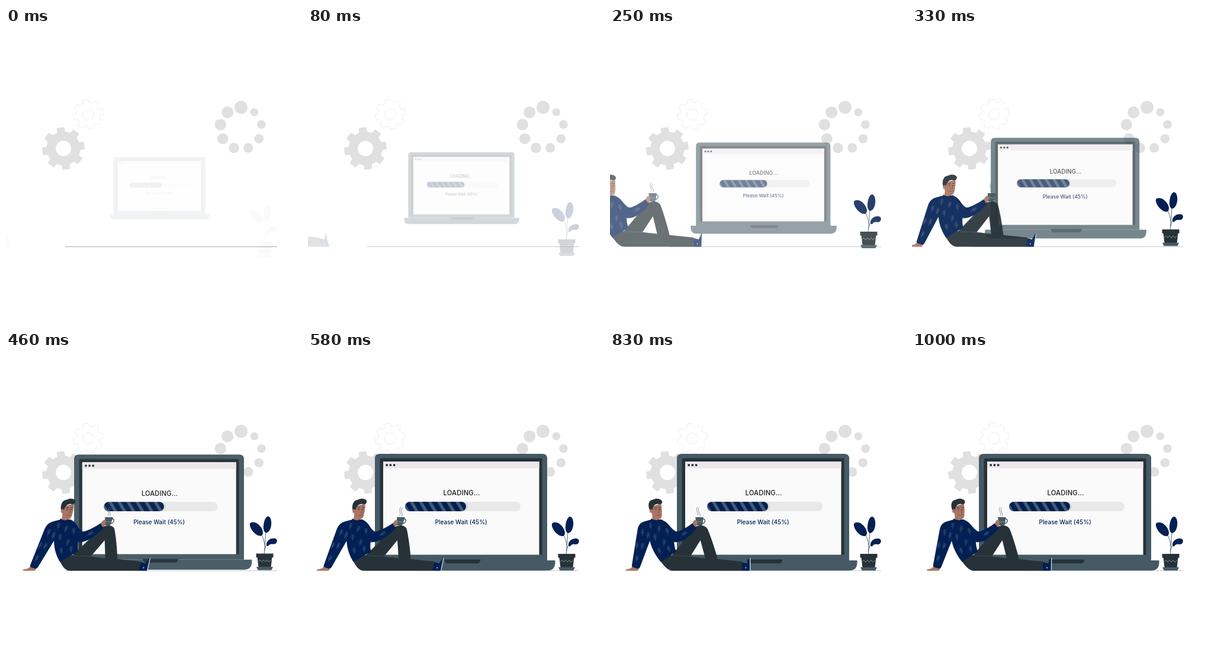
An HTML page that plays this animation: 500 px wide and 500 px high, repeating every 1.04 s.

```html
<!DOCTYPE html>
<html lang="en">
<head>
<meta charset="utf-8">
<title>Loading</title>
<style>
  html, body { margin: 0; width: 100%; height: 100%; overflow: hidden; background: #fff; }
  svg { display: block; width: 100vw; height: 100vh; }
  text { font-family: Inter, "Open Sans", sans-serif; font-weight: 500; text-anchor: middle; }
  .dark { fill: #263238; }
  .slate { fill: #455a64; }
  .navy { fill: #022053; }
  .skin { fill: #a97462; }
  .line { fill: none; stroke-linecap: round; stroke-linejoin: round; }
</style>
</head>
<body>
<svg viewBox="0 0 500 500">
  <defs>
    <pattern id="stripes" width="15.500" height="16" patternUnits="userSpaceOnUse" x="171.500" y="253">
      <rect width="15.500" height="16" fill="#021f50"/>
      <path d="M0 0H6L15.500 16H9.500ZM-15.500 0H-9.500L0 16H-6Z" fill="#455a74"/>
    </pattern>
    <g id="sprig" class="line" stroke="#4f6489" stroke-width=".6">
      <path d="M0 6V-5M0 3L-3 0M0 3L3 0M0 0L-3-3M0 0L3-3M0-3L-2-6M0-3L2-6"/>
    </g>
  </defs>

  <g id="scenery" fill="#e0e0e0"></g>
  <path id="floor" d="M100 369.5H458" stroke-width=".8"/>

  <g id="laptop">
    <path class="slate" d="M113 352V180Q113 172 121 172H396Q404 172 404 180V352Z"/>
    <path class="dark" d="M121.500 342.500V182Q121.500 179.500 124 179.500H393Q395.500 179.500 395.500 182V342.500Z"/>
    <rect x="127" y="185" width="263.500" height="157.500" fill="#fafafa"/>
    <rect x="127" y="185" width="263.500" height="11.500" fill="#ede7ec"/>
    <g class="dark">
      <circle cx="133.200" cy="191" r="2"/><circle cx="139.400" cy="191" r="2"/><circle cx="145.600" cy="191" r="2"/>
    </g>
    <path class="slate" d="M101.500 352H417.500V356Q417 369 405 369H114Q102 369 101.500 356Z"/>
    <path class="dark" d="M230 350.500H292L289.500 355.500Q289 357 287 357H235Q233 357 232.500 355.500Z"/>
    <text x="259.600" y="242.300" font-size="11.200" letter-spacing=".2" fill="#15191c">LOADING...</text>
    <rect x="164" y="253" width="195" height="16" rx="8" fill="#e8e8e8"/>
    <rect x="164" y="253" width="106.500" height="16" rx="8" fill="#dadada"/>
    <rect x="164" y="253" width="103" height="16" rx="8" fill="url(#stripes)"/>
    <text x="258.700" y="291" font-size="10" class="navy">Please Wait (45%)</text>
  </g>

  <g id="plant">
    <g class="line" stroke="#455a64" stroke-width=".9">
      <path d="M436 342Q438 324 439 303M437.500 329Q436 315 430 306M436.500 337Q438 327 443 324"/>
    </g>
    <g class="navy">
      <path d="M413 289C418 286 426 289 431 297C435 303 435 309 431 311C425 312 418 306 414 299C412 295 411 291 413 289Z"/>
      <path d="M443 278C447 279 449 286 448 293C447 301 443 306 439 306C435 304 434 298 435.500 290C437 282 440 278 443 278Z"/>
      <path d="M440 324C442 317 449 314 455 315.500C459 317 458.500 322 455 324.500C451 326 447 323 444 327C442 330 439 328 440 324Z"/>
    </g>
    <path class="dark" d="M422.500 341H451.500V347.500H449.500L447.500 364H426.500L424.500 347.500H422.500Z"/>
    <path class="slate" d="M423 363.500H451L448.500 369H425.500Z"/>
    <path class="line" d="M426 354L429 351.500L432 355L435 351.500L438 355L441 351.500L444 355L448 351.500" stroke="#8b999f" stroke-width=".9"/>
  </g>

  <g id="man">
    <path class="dark" d="M83 351C94 344 105 341.500 116 343L222 354L220.500 369.500H104C96 369 89 361 83 351Z"/>
    <path class="dark" d="M104 343L140 299.500C147 291 160 291 165 299C171 314 177 334 181 350.500L160 348.500L152.500 318L135 345Z"/>
    <path class="line" d="M106 344L135 345L160 348.500" stroke="#4d5f68" stroke-width=".6"/>
    <path class="navy" d="M221.500 355L230 357Q233 352 234.300 347L235.500 348L235 369.500H220.500Z"/>
    <path class="line" d="M235.700 348L235.300 369.500" stroke="#e6eaef" stroke-width="1.200"/>
    <circle cx="228" cy="364.500" r="1" fill="#e5e9f0"/>

    <g transform="translate(-1.500 0)">
      <path class="skin" d="M38 362L49 365L47 369.500H27Q25 368 29 367L35 365.500Z"/>
      <path class="navy" d="M72 283L61 286C53 288 50 293 48.500 299L37 361Q37 363 40 364L47 366Q50 366 51 363L68.500 319C72 334 78 344 86 354.500L113 337C108 327 110 315 108 305C105 294 98 287 89 283Z"/>
    </g>
    <path class="navy" d="M93 287.500C102 292 106 302 113 303.500C123 301 132 295 140 289L146.500 297C139 308 128 317 117 320.500C106 322.500 98 317 92 309Z"/>
    <path class="line" d="M67 319Q63.500 309 64.500 300M113 303.500Q108 305 104 303M104 320Q107 322 112 321" stroke="#122f66" stroke-width=".8"/>
    <g id="knit"></g>

    <g transform="translate(2 0) scale(.95 1)">
      <path class="skin" d="M70 262L90 256C91.500 263 91.500 269 91 275C91 281 87 283 83.500 283L84 286Q77 289 74 284V276Z"/>
      <path class="navy" d="M72 281Q79 286.500 89 282.500L91 287.500Q80 291 70.500 286.500Z"/>
      <path class="dark" d="M69 266C66 256 69 250 76 249.500C81 246 91 248 92 252.500C93 257 88 258 84 256.500C78 257.500 76 260 75 265L73.500 269Q71 270 69 266Z"/>
      <ellipse class="skin" cx="72" cy="268.500" rx="2.400" ry="3.200"/>
      <g class="dark"><circle cx="80.500" cy="266.500" r=".9"/><circle cx="87.500" cy="266" r=".9"/></g>
      <path class="line" d="M78.500 263.500Q80.500 262 82.500 263.200M86 262.800L89 262.200" stroke="#263238" stroke-width=".9"/>
      <path class="line" d="M85 266L86.800 271L84.500 271.500M82 275.500Q85 277.500 88 275" stroke="#6d4034" stroke-width=".7"/>
    </g>

    <path class="line" d="M157 282C163 281 162 290 156 289.500" stroke="#455a64" stroke-width="1.500"/>
    <path class="slate" d="M145 279H158.500L157 291Q156.500 293 154 293H149Q146.500 293 146.300 291Z"/>
    <path class="line" d="M148 286L150 288L152 286L154 288L156 286" stroke="#9aa8ae" stroke-width=".7"/>
    <path class="skin" d="M140 290C141 285 144 282.500 147 284.500L148 289Q148 293 144.500 296Z"/>
    <path class="line" d="M149 276Q151 273 148.500 270Q146 266 148.500 262M153 277Q153.500 273 151 270Q149 266 151.500 263" stroke="#66757c" stroke-width=".7"/>
  </g>
</svg>
<script>
  const $ = id => document.getElementById(id);
  const LOOP = 1040, STEPS = 25, FPS = 24;

  function gear(cx, cy, root, tip, hole, turn) {
    const at = (r, deg) => {
      const a = deg * Math.PI / 180;
      return (cx + r * Math.cos(a)).toFixed(2) + ' ' + (cy + r * Math.sin(a)).toFixed(2);
    };
    let d = '';
    for (let i = 0; i < 8; i++) {
      const a = turn + i * 45;
      d += (i ? 'A' + [root, root, 0, 0, 1].join(' ') + ' ' : 'M') + at(root, a - 14);
      d += 'L' + at(tip, a - 10) + 'L' + at(tip, a + 10) + 'L' + at(root, a + 14);
    }
    return d + `Z M${cx - hole} ${cy}a${hole} ${hole} 0 1 0 ${2 * hole} 0a${hole} ${hole} 0 1 0 ${-2 * hole} 0Z`;
  }

  const dots = [[397, 134, 11], [374.2, 142.4, 10], [362.3, 163.2, 9.7], [366.3, 187, 9.3], [385, 202.5, 8.7],
    [409.2, 202.4, 8.1], [427.3, 187, 7.8], [431.5, 163, 7.3], [419.4, 142.3, 6.8]];
  $('scenery').innerHTML =
    `<path fill-rule="evenodd" d="${gear(97, 203.5, 28.5, 36.3, 13, -98)}"/>` +
    `<path class="line" stroke="#e9e9e9" stroke-width=".8" d="${gear(139, 146, 20.5, 25.7, 9.5, -101)}"/>` +
    dots.map(([x, y, r]) => `<circle cx="${x}" cy="${y}" r="${r}"/>`).join('');

  // x, y, rotation of each knitted sprig
  const sprigs = [[69, 294, 0], [83, 299, 10], [55, 305, 10], [76, 313, -10], [91, 322, 5], [64, 310, 15],
    [45, 327, 12], [44, 349, 20], [97, 303, -15], [83, 336, -20], [99, 333, -15], [125, 307, 55], [54, 328, 15]];
  $('knit').innerHTML = sprigs.map(([x, y, a]) =>
    `<use href="#sprig" transform="translate(${x} ${y}) rotate(${a}) scale(.9)"/>`).join('');

  const clamp = v => Math.min(1, Math.max(0, v));
  const mix = (a, b, p) => a + (b - a) * p;

  // cubic-bezier(.36, -.01, .5, 1.38): ends with an overshoot
  function swing(x) {
    if (x <= 0 || x >= 1) return clamp(x);
    const curve = (a, b, t) => 3 * (1 - t) * (1 - t) * t * a + 3 * (1 - t) * t * t * b + t * t * t;
    let lo = 0, hi = 1;
    for (let i = 0; i < 24; i++) {
      const mid = (lo + hi) / 2;
      if (curve(.36, .5, mid) < x) lo = mid; else hi = mid;
    }
    return curve(-.01, 1.38, lo);
  }

  function slideMan(p) {
    let dx = 0, skew, alpha = 1;
    if (p < .6) {
      const e = swing(p / .6);
      dx = mix(-250, 0, e);
      skew = mix(20, -10, e);
      alpha = clamp(e);
    } else if (p < .8) {
      skew = mix(-10, 2, swing((p - .6) / .2));
    } else {
      skew = mix(2, 0, swing((p - .8) / .2));
    }
    $('man').setAttribute('transform', `translate(${dx} 309) skewX(${skew}) translate(0 -309)`);
    $('man').setAttribute('opacity', alpha);
  }

  function draw(t) {
    let step = STEPS - 1;
    while (Math.round(step * 100 / FPS) * 10 > t) step--;
    const sec = .034 + step * .0411;
    const half = clamp(sec / .5);

    const zoom = mix(.5, 1, half);
    $('laptop').setAttribute('transform', `translate(259.7 270.5) scale(${zoom}) translate(-259.7 -270.5)`);
    $('laptop').setAttribute('opacity', half);

    const rise = swing(half);
    $('plant').setAttribute('transform', `translate(0 ${mix(20, 0, rise)})`);
    $('plant').setAttribute('opacity', clamp(rise));

    $('floor').setAttribute('stroke', step ? '#bcc1c3' : '#959595');
    slideMan(clamp(sec));
  }

  const start = performance.now();
  function tick() {
    draw((performance.now() - start) % LOOP);
    requestAnimationFrame(tick);
  }
  draw(0);
  requestAnimationFrame(tick);
</script>
</body>
</html>
```
